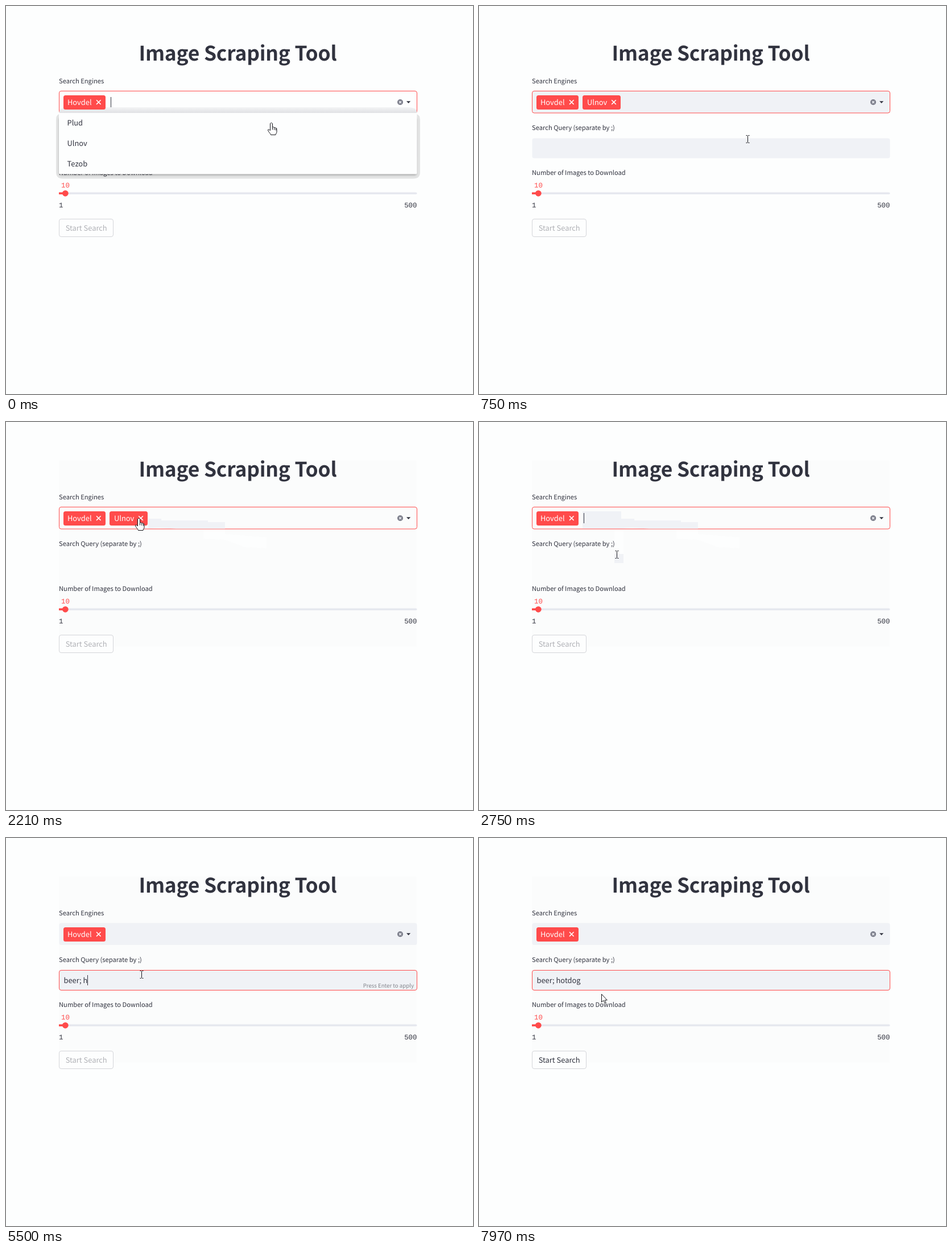
Write an HTML page that moves like this. It is 821 px wide and 682 px high and loops after 8000 ms.

```html
<!DOCTYPE html>
<html lang="en">
<head>
<meta charset="utf-8">
<title>Image Scraping Tool</title>
<style>
  html, body { margin: 0; width: 100%; height: 100%; overflow: hidden; background: #fdfefe; }
  svg { display: block; width: 821px; height: 682px; }
  text {
    font-family: "Noto Sans CJK JP", "Noto Sans CJK SC", "Noto Sans CJK", "Open Sans", sans-serif;
    font-size: 12.88px; fill: #31333f; white-space: pre; text-rendering: geometricPrecision;
  }
  .title { font-size: 35.4px; font-weight: 700; letter-spacing: -.2px; text-anchor: middle; }
  .label { font-size: 11.2px; }
  .mono { font: 12.4px "Liberation Mono", monospace; }
  .hint { font-size: 9.66px; fill: #83858c; text-anchor: end; }
  .tag rect { fill: #ff4b4b; }
  .tag text { fill: #fff; }
  .tag path { stroke: #fff; stroke-width: 1.5; }
  .red { fill: #ff4b4b; }
  .grey { fill: #f0f2f6; }
  .pale { fill: #fdfefe; }
  .field { stroke: none; }
  .focus { stroke: #ff4b4b; }
  .button { fill: #fdfefe; stroke: #d4d5d9; }
  .caret { fill: #31333f; }
  .cursor path { stroke: #16171c; stroke-width: 1; stroke-linejoin: round; fill: #fff; }
</style>
</head>
<body>
<svg viewBox="0 0 821 682">
  <defs>
    <linearGradient id="fade" x2="0" y2="1">
      <stop stop-color="#f3f4f5"/><stop offset="1" stop-color="#e0e1e4"/>
    </linearGradient>
    <clipPath id="wipe"><rect id="wipeBox" y="150" width="470" height="100"/></clipPath>
    <filter id="soft" x="-5%" y="-20%" width="110%" height="140%"><feGaussianBlur stdDeviation="1.5"/></filter>
  </defs>

  <rect id="panel" x="93" y="68" width="629" height="327" fill="#fbfcfc"/>
  <text class="title" x="407.4" y="96">Image Scraping Tool</text>
  <text class="label" x="93" y="136">Search Engines</text>
  <rect id="engines" class="field" x="93.5" y="149.5" width="629" height="38.5" rx="3.5"/>
  <rect id="query" class="field" x="93.5" y="232.5" width="629" height="35" rx="3.5"/>
  <path id="shade" d="M94 188V183Q98 178 112 178H704Q718 178 722 183V188Z" fill="url(#fade)"/>

  <g id="trail" clip-path="url(#wipe)">
    <path class="grey" d="M250 170H273V173H355V176H385V187.5H300L268 186 250 187Z"/>
    <path class="pale" d="M347 190H385V197L458 203V222L420 220 385 207 347 205Z"/>
  </g>
  <path id="tagGap" class="grey" d="M182 157H250V187H182Z"/>
  <g id="drop">
    <path class="pale" d="M238 190H254V232H238Z"/>
    <path class="grey" d="M238 232H254V248H238Z"/>
  </g>

  <text class="label" x="93" y="218">Search Query (separate by ;)</text>
  <text class="label" x="93" y="297">Number of Images to Download</text>

  <g class="tag">
    <rect x="101" y="157" width="74" height="25" rx="3.5"/>
    <text x="108" y="174">Hovdel</text>
    <path d="M159 165.3l7.6 7.6m0-7.6l-7.6 7.6"/>
  </g>
  <g id="second" class="tag">
    <rect x="182" y="157" width="67" height="25" rx="3.5"/>
    <text x="190" y="174">Ulnov</text>
    <path d="M233.2 165.3l7.6 7.6m0-7.6l-7.6 7.6"/>
  </g>
  <circle cx="693" cy="169" r="5" fill="#7b7d8a"/>
  <path d="M691 167l4 4m0-4l-4 4" stroke="#f0f2f6" stroke-width="1.2"/>
  <path d="M704 167.3h7.2l-3.6 3.8z" fill="#31333f"/>

  <text class="mono" x="97" y="319" style="fill:#ff4b4b">10</text>
  <rect x="93" y="327.5" width="629.5" height="3.6" rx="1.8" fill="#e6e8ef"/>
  <rect class="red" x="93" y="327.5" width="11" height="3.6"/>
  <circle class="red" cx="104.3" cy="329.3" r="5.4"/>
  <text class="mono" x="93" y="354">1</text>
  <text class="mono" x="722.5" y="354" text-anchor="end">500</text>

  <rect class="button" x="93.5" y="374.5" width="95" height="31" rx="3.5"/>
  <text id="start" x="104.7" y="395">Start Search</text>

  <text id="typed" x="101.5" y="255"></text>
  <text id="hint" class="hint" x="717" y="263">Press Enter to apply</text>
  <rect id="typeCaret" class="caret" y="241" width="1" height="18"/>
  <rect id="tagCaret" class="caret" x="184" y="160" width="1" height="18"/>

  <g id="menu">
    <path d="M93 190Q88 192 88 200V292Q88 303.5 100 303.5H716Q728 303.5 728 292V200Q728 192 722 190Z" fill="#000" opacity=".1"/>
    <rect x="93" y="196" width="629" height="101.5" rx="4" fill="#000" opacity=".25" filter="url(#soft)"/>
    <rect class="pale" x="93" y="188" width="629.5" height="107.5" rx="2"/>
    <text x="107.5" y="210">Plud</text>
    <text x="107.5" y="246">Ulnov</text>
    <text x="107.5" y="282">Tezob</text>
  </g>

  <g id="cursor" class="cursor">
    <path id="hand" d="M-2 1.5C-2-.5 2-.5 2 1.5V8C3 6.8 5 7 5.2 8.6 6 7.6 8 8 8 9.6 9 8.8 9.5 9.6 9.5 11V15.5C9.5 18 7.5 19 7.5 21H-1C-1 19-6 15-6 12.5-6 11-4 11-2 13.5ZM2 8V12M5.2 8.6V12.5M8 9.6V13"/>
    <path id="beam" d="M-3-7H-1L0-6 1-7H3M0-6V5M-3 6H-1L0 5 1 6H3" style="fill:none"/>
    <path id="arrow" d="M0 0V14L3.3 11 5.8 16 7.8 15 5.5 10.5H9.8Z"/>
  </g>
</svg>
<script>
const LOOP = 8000;
const $ = id => document.getElementById(id);
const show = (id, on) => { $(id).style.display = on ? '' : 'none'; };
const within = (t, ...spans) => spans.some(([a, b]) => t >= a && t < b);

// Pointer hot spot: time, x, y
const path = [
  [0, 466, 205], [240, 483, 221], [420, 472, 234], [750, 472, 234],
  [1000, 452, 213], [1150, 400, 207], [1300, 365, 190], [1420, 310, 181],
  [1550, 261, 178], [1610, 252, 176], [1790, 234, 170], [1970, 234, 170],
  [2210, 233, 169], [2390, 233, 169], [2450, 237, 173], [2570, 246, 195],
  [2690, 246, 240], [2750, 242, 233], [2870, 242, 233], [3050, 238, 240],
  [7360, 238, 240], [7480, 252, 236], [7730, 252, 236], [7880, 233, 258],
  [7970, 215, 274], [LOOP, 215, 274]
];
const phrase = 'beer; hotdog';
const keys = [4090, 4400, 4490, 4590, 5140, 5320, 5500, 5590, 5680, 5990, 6110, 6230];

function pointAt(t) {
  const i = path.findIndex(p => p[0] > t);
  const [a, b] = [path[i - 1], path[i]];
  const k = (t - a[0]) / (b[0] - a[0]);
  return [1, 2].map(n => Math.round(a[n] + (b[n] - a[n]) * k));
}

function setField(id, filled, focused) {
  $(id).style.fill = filled ? '#f0f2f6' : 'none';
  $(id).classList.toggle('focus', focused);
}

function render(t) {
  const [x, y] = pointAt(t);
  const open = t < 750;
  const bare = within(t, [870, 3110]);
  const inQuery = t >= 3110;

  show('menu', open);
  show('shade', open);
  show('panel', t >= 870);
  setField('engines', !open && !bare, !inQuery);
  setField('query', !bare, inQuery);
  show('second', within(t, [750, 2450]));

  show('trail', bare);
  $('wipeBox').setAttribute('x', t < 1610 ? x : 250);
  show('tagGap', within(t, [2450, 3110]));
  show('drop', within(t, [2690, 3110]));

  const text = phrase.slice(0, keys.filter(k => k <= t).length);
  if ($('typed').textContent !== text) $('typed').textContent = text;
  const width = text ? $('typed').getComputedTextLength() : 0;
  $('typeCaret').setAttribute('x', Math.round(101 + width));
  show('typeCaret', within(t, [3110, 3660], [4090, 6740], [7240, 7790]));
  show('tagCaret', within(t, [0, 240], [2570, 3110]));
  show('hint', within(t, [4090, 6940]));
  $('start').style.fill = t < 7000 ? '#b0b1b6' : '#31333f';

  const kind = open || within(t, [1670, 2450]) ? 'hand' : t < 7880 ? 'beam' : 'arrow';
  for (const id of ['hand', 'beam', 'arrow']) show(id, id === kind);
  $('cursor').setAttribute('transform', `translate(${x + .5} ${y + .5})`);
}

const begin = performance.now();
function tick() {
  render((performance.now() - begin) % LOOP);
  requestAnimationFrame(tick);
}
tick();
</script>
</body>
</html>
```
